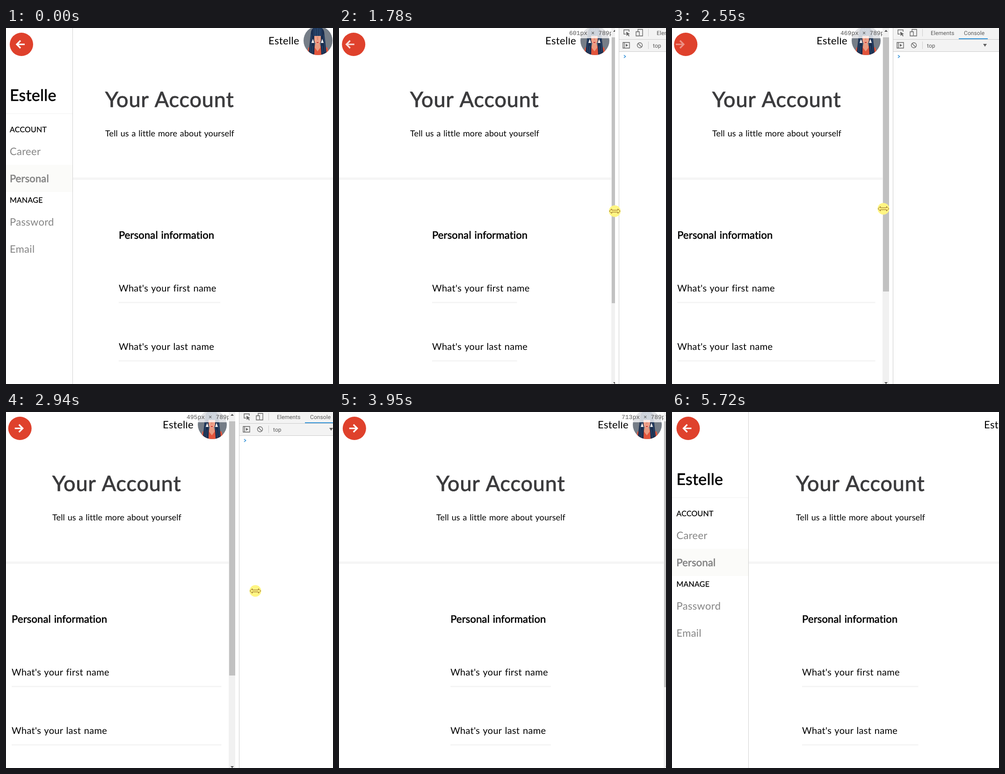
These frames come from a looping animation (699x762 px, 6500 ms). An HTML page:

```html
<!DOCTYPE html>
<html lang="en">
<head>
<meta charset="utf-8">
<title>Account page being resized</title>
<style>
html, body { margin: 0; width: 100%; height: 100%; overflow: hidden; background: #fff; }
svg { display: block; width: 699px; height: 762px; font-family: Lato, "Open Sans", sans-serif; }
text { white-space: pre; text-rendering: geometricPrecision; }
.medium { stroke: currentColor; stroke-width: .6px; }
.item { font-size: 22px; fill: #858585; letter-spacing: .3px; }
.caps { font-size: 16px; fill: #000; letter-spacing: .2px; color: #000; stroke-width: .25px; }
.field { font-size: 20px; letter-spacing: .3px; word-spacing: 1.2px; }
.tools { font: 12px Roboto, "Open Sans", sans-serif; fill: #5a5a5a; letter-spacing: .1px; }
.size { font: 13px "Liberation Mono", monospace; fill: #555; }
</style>
</head>
<body>
<svg viewBox="0 0 699 762">
  <defs>
    <clipPath id="disc"><circle cx="31" cy="27" r="31"/></clipPath>
    <clipPath id="round"><circle cx="25" cy="35" r="25"/></clipPath>
  </defs>
  <rect width="699" height="762" fill="#fff"/>
  <rect id="bar" y="320" height="5" fill="#f5f5f5"/>

  <g id="side">
    <rect id="active" y="293" height="58" fill="#fbfbf9"/>
    <rect id="rule" y="183" height="1" fill="#f2f2f2"/>
    <rect id="edge" y="0" width="1" height="762" fill="#d2d2d2"/>
    <g id="menu">
      <text class="medium" y="156" font-size="34" letter-spacing=".2" color="#000">Estelle</text>
      <text class="caps medium" y="223">ACCOUNT</text>
      <text class="item" y="272">Career</text>
      <text class="item medium" y="330" color="#7c7c7c" style="letter-spacing:.15px">Personal</text>
      <text class="caps medium" y="374">MANAGE</text>
      <text class="item" y="423">Password</text>
      <text class="item" y="481">Email</text>
    </g>
  </g>

  <g id="button">
    <circle cx="25" cy="35" r="25" fill="#df412c"/>
    <g clip-path="url(#round)" fill="none" stroke="#fff" stroke-width="3.2">
      <path id="back" d="M32 35H15M23 27L15 35L23 43"/>
      <path id="forth" d="M14 35H31M23 27L31 35L23 43"/>
    </g>
  </g>

  <g id="head">
    <text class="medium" x="212" y="169" font-size="45" letter-spacing=".9" word-spacing="2" fill="#3b3b3d" color="#3b3b3d" style="stroke-width:.9px">Your Account</text>
    <text x="212" y="232" font-size="18" letter-spacing=".12" word-spacing="1">Tell us a little more about yourself</text>
  </g>

  <g id="form">
    <text class="medium" y="451" font-size="22" letter-spacing=".15" word-spacing="1" color="#000">Personal information</text>
    <text class="field" y="564">What's your first name</text>
    <text class="field" y="689">What's your last name</text>
    <rect class="line" y="586" height="3" fill="#f5f5f5"/>
    <rect class="line" y="711" height="3" fill="#f5f5f5"/>
  </g>

  <g id="user">
    <text x="-75" y="35" font-size="22" letter-spacing=".35">Estelle</text>
    <g clip-path="url(#disc)">
      <rect y="-5" width="62" height="64" fill="#757d87"/>
      <path d="M7 60L10 42L24 38H38L51 42L55 60Z" fill="#e2553c"/>
      <path d="M25 34H35L36 42L30 50L24 42Z" fill="#ea9a80"/>
      <path d="M16 8Q18 -2 30 -2Q42 -2 44 8L49 52Q45 58 38 57L36 24H24L23 57Q16 58 11 52Z" fill="#1b2d4d"/>
      <path d="M23 14H37V27Q35 35 30 36Q25 35 23 27Z" fill="#eea088"/>
      <path d="M20 0H40V17H20Z" fill="#21395d"/>
      <path d="M25 2V17M30 0V17M35 2V17M17 14L15 52M43 14L46 52M20 38L18 56M40 38L42 56" stroke="#2f567f" stroke-width="1" fill="none"/>
      <path d="M30 19V26" stroke="#d9806c" stroke-width="1.5"/>
      <path d="M28 31H32" stroke="#cc3c39" stroke-width="2"/>
      <path d="M20 23L23 32H17ZM40 23L43 32H37Z" fill="#f4f2f0"/>
    </g>
  </g>

  <g id="label">
    <rect x="-92" width="92" height="22" fill="#fff" opacity=".78"/>
    <text id="size" class="size" x="-90" y="15"></text>
  </g>

  <g id="scroll">
    <rect width="15" height="762" fill="#f1f1f1"/>
    <rect id="thumb" x="1" y="20" width="13" fill="#c1c1c1"/>
    <path d="M4 8L7.500 4L11 8ZM4 758L7.500 762L11 758Z" fill="#505050"/>
  </g>

  <g id="dev">
    <rect x="-8" width="720" height="762" fill="#fff"/>
    <rect width="700" height="50" fill="#f3f3f3"/>
    <path d="M.5 0V762M0 24.500H700M0 50.500H700" stroke="#ccc"/>
    <path d="M63.500 2V18M63.500 29V45" stroke="#ccc"/>
    <rect x="141" y="22" width="62" height="2" fill="#3a97d9"/>
    <g fill="none" stroke="#606060" stroke-width="1.300">
      <path d="M15 13H11V4H22V8M41 8V3H51V17H45M37 8H44V17H37Z"/>
      <path d="M9 31H23V43H9ZM12 31V43"/>
      <circle cx="45" cy="37" r="5.500"/>
      <path d="M41 33L49 41"/>
    </g>
    <path d="M16 8L24 13L20.500 13.500L23 17L21.500 18L19 14.500L16.500 17ZM15 34L20 37L15 40ZM193 34H201L197 40Z" fill="#606060"/>
    <text class="tools" x="81" y="15">Elements</text>
    <text class="tools" x="152" y="15" fill="#333">Console</text>
    <text class="tools" x="73" y="42">top</text>
    <path d="M11 58L14.500 61L11 64" fill="none" stroke="#2f8fd8" stroke-width="1.600"/>
  </g>

  <g id="cursor">
    <circle r="12.500" fill="#fff583"/>
    <path id="resize" d="M-11.500 0L-6.500 -5V-2H6.500V-5L11.500 0L6.500 5V2H-6.500V5Z" fill="#fff583" stroke="#8a5a1c"/>
    <path id="pointer" d="M0 0V15L3.500 12L6 17.500L8.200 16.500L5.800 11H10.500Z" fill="#fff" stroke="#000"/>
  </g>
</svg>
<script>
const LOOP = 6500, STEP = 80, START = 1360;
const el = {};
document.querySelectorAll("svg [id]").forEach(n => el[n.id] = n);
const lines = document.querySelectorAll(".line");

// page width relative to the first pose, and the dragging pointer
const widthKeys = [[1360, 0], [1760, -120], [2160, -211], [2480, -252], [2720, -252], [2880, -226],
  [3360, -122], [3480, -122], [3920, -8], [4000, -4], [4080, -4], [4160, 6], [4640, 76], [4720, 76],
  [4800, 85], [5120, 106]];
const dragKeys = [[1360, 697], [2160, 482], [2480, 452], [2640, 456], [2880, 533], [3360, 606],
  [3480, 606], [3600, 720]];

function track(keys, t) {
  if (t <= keys[0][0]) return keys[0][1];
  for (let i = 1; i < keys.length; i++) {
    const [t0, a] = keys[i - 1], [t1, b] = keys[i];
    if (t <= t1) return a + (b - a) * (t - t0) / (t1 - t0);
  }
  return keys[keys.length - 1][1];
}

const set = (node, name, value) => node.setAttribute(name, value);
const move = (node, x, y = 0) => set(node, "transform", `translate(${x} ${y})`);
const show = (node, on) => set(node, "display", on ? "inline" : "none");
const ramp = (t, a, b) => Math.min(1, Math.max(0, (t - a) / (b - a)));

function pointerAt(t) {
  if (t >= 130 && t < 210) return [638, 749];
  if (t >= 210 && t < 290) return [687, 601];
  if (t >= 5640 && t < 5720) return [703, 743.5];
  return null;
}

// the old arrow slides out of the button before the new one slides in
function icons(t) {
  const closing = ramp(t, 1360, 2240), opening = ramp(t, 4500, 4880);
  const shut = t < 4160;
  set(el.back, "opacity", shut ? Math.min(1, (1 - closing) * 1.5) : Math.min(1, opening * 2));
  move(el.back, shut ? -12 * closing : 22 * (1 - opening));
  const enter = ramp(t, 2240, 2800), leave = ramp(t, 4160, 4480);
  set(el.forth, "opacity", enter * (1 - leave));
  move(el.forth, -18 * (1 - enter) + 18 * leave);
}

function draw(time) {
  const t = Math.max(START, START + Math.floor((time - START) / STEP) * STEP);
  const d = Math.round(track(widthKeys, t)), right = 702 + d, total = right + 19;
  const open = d > -1, side = open ? Math.round(142 + d * .2) : 0, inset = 8 + d * .0145;

  show(el.side, open);
  set(el.active, "width", side);
  set(el.rule, "width", side);
  set(el.edge, "x", side);
  move(el.menu, inset);
  set(el.bar, "x", side + (open ? 1 : 0));
  set(el.bar, "width", Math.max(0, right - side));
  move(el.button, inset);
  icons(t);

  move(el.head, d / 2);
  const narrow = total < 600;
  const left = narrow ? right * .033 - 3.6 : 241 + d * .35;
  move(el.form, left);
  for (const line of lines) set(line, "width", narrow ? right - 15.5 - left : 217 + d * .295);

  move(el.user, right - 66);
  show(el.label, t > START);
  move(el.label, right);
  el.size.textContent = `${total}px × 789px`;
  move(el.scroll, right);
  set(el.thumb, "height", narrow ? 544 : 569);
  move(el.dev, right + (t > START && t < 2480 ? 16 : 22));

  const point = pointerAt(time);
  const dragging = time >= START && time < 3680;
  show(el.cursor, point || dragging);
  show(el.pointer, point);
  show(el.resize, dragging);
  if (point) move(el.cursor, ...point);
  else if (dragging) move(el.cursor, track(dragKeys, t), 394 - 4 * ramp(t, 1360, 2160) - 7 * ramp(t, 2160, 2880));
}

const begin = performance.now();
function tick() {
  draw((performance.now() - begin) % LOOP);
  requestAnimationFrame(tick);
}
tick();
</script>
</body>
</html>
```
